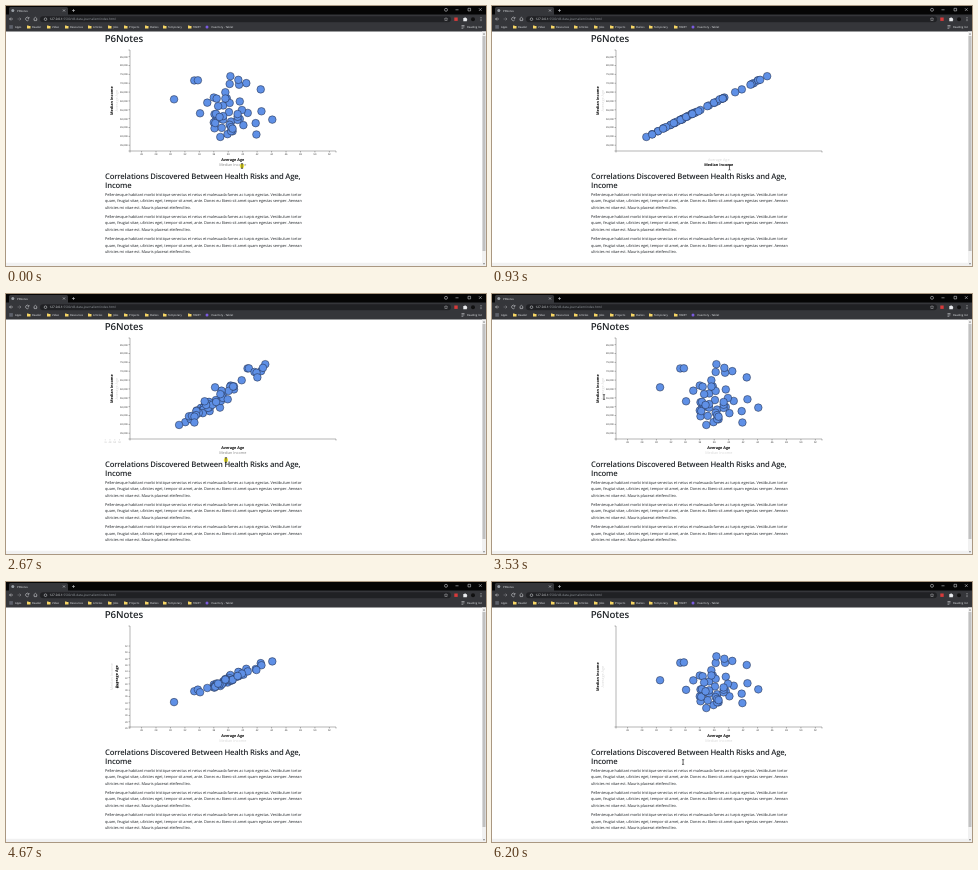
Animation of 480 by 260 pixels, one loop 6.27 s. Source, as an HTML page:

```html
<!DOCTYPE html>
<html lang="en">
<head>
<meta charset="utf-8">
<title>P6Notes</title>
<style>
html, body { margin: 0; width: 100%; height: 100%; overflow: hidden; background: #fff; }
svg { display: block; width: 480px; height: 260px; text-rendering: geometricPrecision; }
text { font-family: "Open Sans", "Noto Sans", sans-serif; fill: #212529; white-space: pre; }
.ui text { font-size: 2.75px; fill: #e8eaed; }
.ui .url { font-size: 3.1px; }
.icon { fill: none; stroke: #d5d7da; stroke-width: .55; }
h1 { font-size: 10px; }
.title { font-size: 9.7px; font-weight: 600; letter-spacing: -.1px; }
.head { font-size: 7.7px; font-weight: 600; letter-spacing: -.17px; }
.body { font-size: 3.9px; letter-spacing: -.065px; }
.tick text { font: 2.5px "Liberation Sans", sans-serif; fill: #333; }
.tick line, .axis { fill: none; stroke: #444; stroke-width: .4; }
.label { font-size: 3.75px; text-anchor: middle; }
.dot { fill: #5f90e6; stroke: #1c2740; stroke-width: .5; }
</style>
</head>
<body>
<svg viewBox="0 0 480 260">
  <clipPath id="plot"><rect x="98.6" y="39" width="243" height="127"/></clipPath>
  <g class="ui" id="ui">
    <rect width="480" height="9" fill="#050505"/>
    <path d="M3 9V2.5Q3 1 4.500 1H60.500Q62 1 62 2.500V9z" fill="#35363a"/>
    <rect y="8.500" width="480" height="17" fill="#35363a"/>
    <rect x="34" y="10.200" width="411" height="6" rx="3" fill="#202124"/>
    <circle cx="6.800" cy="4.500" r="1.500" fill="#9aa0a6"/>
    <text x="11" y="5.600">P6Notes</text>
    <g class="icon">
      <path d="M57 3.500l2 2m0-2l-2 2M66 4.500h3m-1.500-1.500v3"/>
      <path d="M449.500 3.800h3M462 2.300h2.600v2.600h-2.600zM473 2.300l2.600 2.600m0-2.600l-2.600 2.600"/>
      <circle cx="440" cy="3.800" r="1.500"/>
      <path d="M7 13H3.500m1.500-1.500L3.500 13l1.500 1.500"/>
      <path d="M11.500 13H15m-1.500-1.500L15 13l-1.500 1.500" opacity=".5"/>
      <path d="M22.700 12a1.700 1.700 0 1 0 .1 1.700M23 11v1.300h-1.400"/>
      <path d="M27.500 13l1.900-1.700 1.900 1.700M28.200 12.800v1.800h2.400v-1.800"/>
      <circle cx="39.500" cy="13.200" r="1.300"/>
      <path d="M440 11.500l.5 1.200 1.300.1-1 .8.300 1.200-1.100-.6-1.100.6.300-1.200-1-.8 1.300-.1z" stroke-width=".35"/>
      <path d="M455.500 19.500h3m-3 1.400h3m-3 1.400h1.800"/>
    </g>
    <text class="url" x="43.500" y="14.300">127.0.0.1:<tspan fill="#9aa0a6">5500/d3-data-journalism/index.html</tspan></text>
    <rect x="448.300" y="11.500" width="3.400" height="3.400" fill="#d83a3a"/>
    <path d="M457.300 12h1.100a.7.700 0 0 1 1.400 0h1v1.100a.7.700 0 0 1 0 1.300v.8h-3.500z" fill="#e8eaed"/>
    <circle cx="467" cy="13.200" r="2" fill="#111"/>
    <path d="M475 11.300v.8m0 .7v.8m0 .7v.8" stroke="#d5d7da" stroke-width=".8"/>
    <text x="461" y="22">Reading list</text>
  </g>
  <g fill="#f1f1f1"><rect x="476" y="25.500" width="4" height="234.500"/><rect y="256.800" width="480" height="3.200"/></g>
  <rect x="476.500" y="30" width="3" height="215" fill="#c1c1c1"/>
  <path d="M477 28.500l1-1.400 1 1.400zM477 257.300l1 1.400 1-1.400z" fill="#666"/>
  <g id="page">
    <text class="title" x="98.700" y="35.800">P6Notes</text>
    <text class="head" x="99" y="172.700">Correlations Discovered Between Health Risks and Age,</text>
    <text class="head" x="99" y="182.200">Income</text>
  </g>
  <g id="chart" clip-path="url(#plot)">
    <path class="axis" d="M122.500 44H124V145H122.500M124 146.500V145H330V146.500"/>
  </g>
  <g id="cursor">
    <circle r="2.200" fill="#ece21c"/>
    <path d="M-1.100-2.500Q0-2.500 0-1.900Q0-2.500 1.100-2.500M0-2V2M-1.100 2.500Q0 2.500 0 1.900Q0 2.500 1.100 2.500" fill="none" stroke="#111" stroke-width=".65"/>
  </g>
</svg>
<script>
const LOOP = 6270, MOVE = 1000;
const CLICK = { xIncome: 90, xAge: 2235, yAge: 3972, yIncome: 5545 };
const $ = id => document.getElementById(id);

// Median age and median income per state
const ages = [38.6, 33.3, 36.9, 37.9, 36, 36.4, 40.5, 39.6, 33.8, 41.8, 36.3, 38.2, 36, 37.3, 37.3, 38.1, 36.1,
  38.4, 36.1, 44.1, 38.3, 39.5, 39.6, 37.8, 36.9, 38.4, 40.1, 36.3, 37.3, 42.5, 39.4, 37.1, 38.2, 38.2, 35.1,
  39.3, 36.2, 39.3, 40.7, 39.9, 38.4, 36.8, 38.6, 34.1, 30.5, 42.6, 37.6, 37.6, 41.9, 39.3, 36.6];
const incomes = [42830, 71583, 50068, 41262, 61933, 61303, 70048, 59716, 71648, 47463, 49321, 69592, 47861,
  57444, 49446, 53712, 52504, 42958, 44555, 49462, 73971, 69160, 49847, 61481, 39680, 48363, 46328, 52686,
  51450, 66532, 71919, 44803, 58878, 46556, 59029, 49308, 47529, 51075, 53234, 54891, 45238, 50979, 44361,
  53035, 60922, 54166, 64902, 61366, 41059, 52622, 57055];

const path = [[0, 236, 160], [530, 237, 162], [1400, 238, 161], [1800, 234, 156], [2270, 234, 156],
  [2670, 220, 166], [2870, 211, 172], [3530, 112, 103], [4670, 112, 103], [5270, 106, 98],
  [5800, 108, 99], [6130, 172, 161], [6200, 191, 180], [LOOP, 196, 182]];

const mix = (a, b, k) => a + (b - a) * k;
const fraction = data => {
  const lo = Math.min(...data) * .8, hi = Math.max(...data) * 1.2;
  return v => (v - lo) / (hi - lo);
};
const ageAt = fraction(ages), incomeAt = fraction(incomes);
const toX = f => 124 + 206 * f, toY = f => 145 - 101 * f;

function ease(t) {
  t = Math.max(0, Math.min(1, t));
  return t < .5 ? 4 * t ** 3 : 1 - 4 * (1 - t) ** 3;
}

function add(parent, tag, attrs = {}, text = '') {
  const el = document.createElementNS('http://www.w3.org/2000/svg', tag);
  for (const k in attrs) el.setAttribute(k, attrs[k]);
  el.textContent = text;
  return parent.appendChild(el);
}

const bookmarks = [[9, 'Apps'], [26, 'Reader'], [46, 'Video'], [64, 'Resources'], [87, 'Articles'], [107, 'Jobs'],
  [123, 'Projects'], [144, 'Dailies'], [162, 'Temporary'], [187, 'SWIFT'], [205, 'Inventory - Tablet']];
bookmarks.forEach(([x, name], i) => {
  const last = i === bookmarks.length - 1;
  if (i === 0) {
    for (let k = 0; k < 9; k++)
      add($('ui'), 'rect', { x: 3.6 + k % 3 * 1.1, y: 19.5 + (k / 3 | 0) * 1.1, width: .7, height: .7, fill: '#b9c4d8' });
  } else if (last) add($('ui'), 'circle', { cx: x - 4, cy: 21, r: 1.5, fill: '#7a5be0' });
  else add($('ui'), 'path', { d: `M${x - 5} 19.400h1.300l.5.500h1.700v2.600h-3.500z`, fill: '#f6d565' });
  add($('ui'), 'text', { x, y: 22 }, name);
});

const lines = ['Pellentesque habitant morbi tristique senectus et netus et malesuada fames ac turpis egestas. Vestibulum tortor',
  'quam, feugiat vitae, ultricies eget, tempor sit amet, ante. Donec eu libero sit amet quam egestas semper. Aenean',
  'ultricies mi vitae est. Mauris placerat eleifend leo.'];
for (let p = 0; p < 3; p++)
  lines.forEach((s, i) => add($('page'), 'text', { class: 'body', x: 99, y: 190.1 + 22.1 * p + 6.2 * i }, s));

const ticks = [];
function addTick(value, income, vertical) {
  const el = add($('chart'), 'g', { class: 'tick' });
  add(el, 'line', vertical ? { x2: -1.5 } : { y2: 1.5 });
  add(el, 'text', vertical ? { x: -2.3, y: .9, 'text-anchor': 'end' } : { y: 4.1, 'text-anchor': 'middle' },
    value.toLocaleString('en-US'));
  ticks.push({ el, value, income, vertical });
}
for (const vertical of [false, true]) {
  for (let v = 26; v <= 52; v += 2) addTick(v, false, vertical);
  for (let v = 35000; v <= 85000; v += 5000) addTick(v, true, vertical);
}

const dots = ages.map(() => add($('chart'), 'circle', { class: 'dot', r: 3.8 }));
const label = (transform, name) => add($('chart'), 'text', { class: 'label', transform }, name);
const xAge = label('translate(226.7 154.900)', 'Average Age');
const xIncome = label('translate(226.7 160)', 'Median Income');
const yIncome = label('translate(106.5 94.700) rotate(-90)', 'Median Income');
const yAge = label('translate(112.4 94.700) rotate(-90)', 'Average Age');

function setLabel(el, active, hover) {
  el.style.fontWeight = active ? 700 : 400;
  el.style.fill = active ? '#000' : hover ? '#858585' : '#d8d8d8';
}

function draw(now) {
  const t = now % LOOP, since = start => ease((t - start) / MOVE);
  // Share of the income scale on each axis
  const wx = since(CLICK.xIncome + 30) - since(CLICK.xAge);
  const wy = 1 - since(CLICK.yAge) + since(CLICK.yIncome);

  for (const { el, value, income, vertical } of ticks) {
    const w = vertical ? wy : wx;
    const f = mix(ageAt(value), incomeAt(value), w);
    el.setAttribute('transform', vertical ? `translate(124 ${toY(f)})` : `translate(${toX(f)} 145)`);
    el.setAttribute('opacity', income ? w : 1 - w);
  }
  dots.forEach((dot, i) => {
    const a = ageAt(ages[i]), b = incomeAt(incomes[i]);
    dot.setAttribute('cx', toX(mix(a, b, wx)));
    dot.setAttribute('cy', toY(mix(a, b, wy)));
  });

  const onIncomeX = t >= CLICK.xIncome && t < CLICK.xAge;
  const onAgeY = t >= CLICK.yAge && t < CLICK.yIncome;
  const hoverX = t < CLICK.xIncome || t > 1650 && t < 2900;
  const hoverY = t > 3600 && t < CLICK.yAge || t > 5250 && t < CLICK.yIncome;
  setLabel(xAge, !onIncomeX, hoverX);
  setLabel(xIncome, onIncomeX, hoverX);
  setLabel(yAge, onAgeY, hoverY);
  setLabel(yIncome, !onAgeY, hoverY);

  const i = path.findIndex(p => p[0] > t), [t0, x0, y0] = path[i - 1], [t1, x1, y1] = path[i];
  const k = (t - t0) / (t1 - t0);
  $('cursor').setAttribute('transform', `translate(${mix(x0, x1, k)} ${mix(y0, y1, k)})`);
  $('cursor').firstElementChild.setAttribute('opacity', t < 130 || t > 1600 && t < 2750 ? .9 : 0);
}

const start = performance.now();
function frame() {
  draw(performance.now() - start);
  requestAnimationFrame(frame);
}
frame();
</script>
</body>
</html>
```
